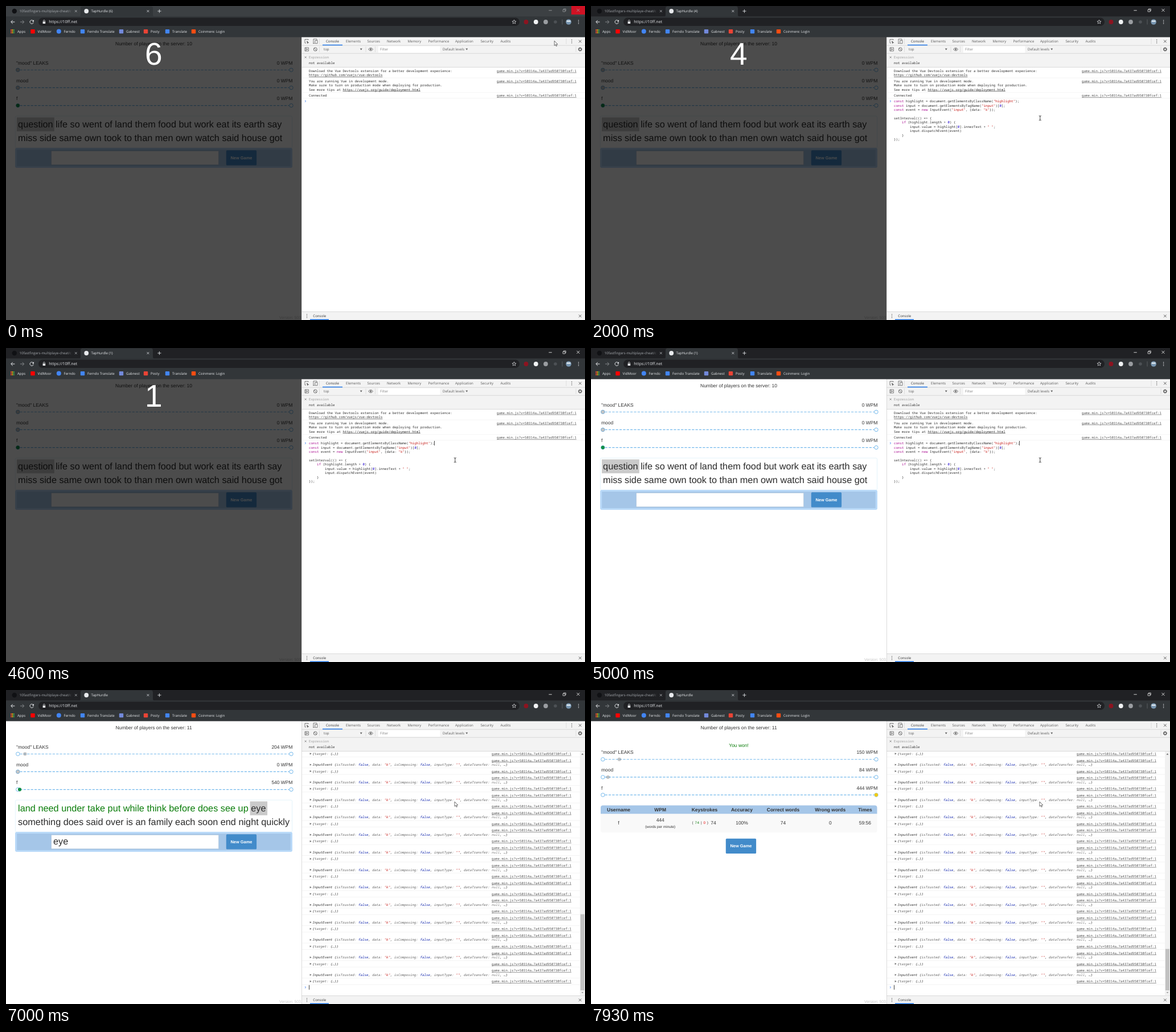
Write an HTML page that moves like this. It is 1017 px wide and 551 px high and loops after 8 s.

```html
<!DOCTYPE html>
<html lang="en">
<head>
<meta charset="utf-8">
<title>Typing race</title>
<style>
  html, body { margin: 0; width: 100%; height: 100%; overflow: hidden; background: #fff; }
  svg { display: block; width: 1017px; height: 551px; }
  text { text-rendering: geometricPrecision; text-decoration-thickness: 0.5px; }
  .page { font-family: "Liberation Sans", Arial, sans-serif; }
  .ui { font-family: "Open Sans", "Noto Sans", sans-serif; }
  .mono { font-family: "Noto Sans Mono", "DejaVu Sans Mono", monospace; }
</style>
</head>
<body>
<svg viewBox="0 0 1017 551">
  <defs>
    <linearGradient id="fade" gradientUnits="userSpaceOnUse" x1="108" y1="0" x2="117" y2="0">
      <stop offset="0" stop-color="#a4a8ad"/><stop offset="1" stop-color="#a4a8ad" stop-opacity="0"/>
    </linearGradient>
  </defs>
  <g id="page"></g><g id="tools"></g><g id="log"></g><g id="frame"></g><g id="browser"></g><g id="pointer"></g>
</svg>
<script>
const DURATION = 8000, ENTER = 6700, WORD_START = 6705, WORD_TIME = 7.7;
const LINES = [
  'question life so went of land them food but work eat its earth say',
  'miss side same own took to than men own watch said house got',
  'land need under take put while think before does see up eye',
  'something does said over is an family each soon end night quickly',
  'very much house white also found still every near add food paper',
  'between own below country plant last school father keep tree never'
].map(line => line.split(' '));
const WORD_COUNT = LINES.flat().length;
const WIN = WORD_START + WORD_COUNT * WORD_TIME;
const CODE = `const highlight = document.getElementsByClassName("highlight");
const input = document.getElementsByTagName("input")[0];
const event = new InputEvent("input", {data: "k"});

setInterval(() => {
    if (highlight.length > 0) {
        input.value = highlight[0].innerText + " ";
        input.dispatchEvent(event)
    }
});`.split('\n');
const LINK = 'game.min.js?v=50314a…7a437ad950730fcef:1';
const BIG = 16.3, BODY = 8.46, MONO = 5.83, UI = 6.1;

const range = n => [...Array(n).keys()];
const rect = (x, y, w, h, fill, extra = '') =>
  `<rect x="${x}" y="${y}" width="${w}" height="${h}" fill="${fill}" ${extra}/>`;
const circle = (x, y, r, fill, extra = '') => `<circle cx="${x}" cy="${y}" r="${r}" fill="${fill}" ${extra}/>`;
const path = (d, stroke, width = 0.8, extra = '') =>
  `<path d="${d}" fill="none" stroke="${stroke}" stroke-width="${width}" ${extra}/>`;
const shape = (d, fill) => `<path d="${d}" fill="${fill}"/>`;
// y is the visual middle of the text; drop leads from there to the baseline, in em
const label = (family, size, fill, drop = 0.33) => (x, y, s, extra = '') =>
  `<text class="${family}" font-size="${size}" x="${x}" y="${(y + size * drop).toFixed(2)}" fill="${fill}" ${extra}>${s}</text>`;
const body = label('page', BODY, '#333'), big = label('page', BIG, '#2b2b2b', 0.3);
const mono = label('mono', MONO, '#303030', 0.35), ui = label('ui', UI, '#5a5a5a');
const source = label('mono', MONO, '#555', 0.35);
const light = label('ui', UI, '#e8eaed');
const span = (fill, s) => `<tspan fill="${fill}">${s}</tspan>`;
const MID = 'text-anchor="middle"', END = 'text-anchor="end"', BOLD = 'font-weight="bold"';
const cross = (x, y, r, color, w = 0.8) =>
  path(`M${x - r} ${y - r}l${2 * r} ${2 * r}M${x + r} ${y - r}l${-2 * r} ${2 * r}`, color, w);
const dots = (x, y, color) => [-2.7, 0, 2.7].map(d => circle(x, y + d, 0.75, color)).join('');
const chevron = (y, color = '#367cf1') => path(`M525 ${y - 1.6}l1.7 1.6l-1.7 1.6`, color, 0.9);
const link = (right, y) => source(right, y, LINK, `${END} text-decoration="underline"`);

const pen = document.createElement('canvas').getContext('2d');
pen.font = `100px "Liberation Sans", Arial, sans-serif`;
const measure = s => pen.measureText(s).width * BIG / 100;

function raceRow(y, name, wpm, x, color) {
  const ring = 'stroke="#74b9ec" stroke-width="1"';
  return body(18, y, name) + body(503.5, y, wpm + ' WPM', END) +
    path(`M24.5 ${y + 12.2}H497.5`, '#74b9ec', 1.1, 'stroke-dasharray="4.24 2.12"') +
    circle(20.8, y + 12.2, 3.2, '#fff', ring) + circle(501, y + 12.2, 3.2, '#fff', ring) +
    circle(x.toFixed(2), y + 12.2, 3.1, color);
}

function button(x, y) {
  return rect(x, y, 53.3, 26.2, '#428bca', 'rx="1.6"') +
    label('page', 7.45, '#fff')(x + 26.6, y + 13.1, 'New Game', `${BOLD} ${MID}`);
}

function wordPanel(t) {
  let index = Math.max(0, Math.floor((t - WORD_START) / WORD_TIME)), row = 0;
  while (index >= LINES[row].length) index -= LINES[row++].length;
  const line = LINES[row], word = line[index];
  const done = line.slice(0, index).map(w => w + ' ').join('');
  return rect(16.4, 193.1, 486.2, 56, '#fff', 'rx="2" stroke="#d9f0f9" stroke-width="0.7"') +
    rect((19 + measure(done)).toFixed(2), 195.5, (measure(word) + 4.2).toFixed(2), 24.3, '#cacaca') +
    big(21.1, 207.8, span('#0a7d0a', done) + line.slice(index).join(' ')) +
    big(21.1, 232.1, (LINES[row + 1] || []).join(' ')) +
    rect(16, 249, 487, 35, '#b9d9f8', 'rx="3"') + rect(19.2, 252, 480.6, 29, '#a5c6e8') +
    rect(79.6, 254.2, 294, 24.6, '#fff', 'stroke="#a8bfd6" stroke-width="0.6"') +
    (t >= WORD_START ? big(83, 266.5, word) : '') + button(386.8, 253.3);
}

function resultTable() {
  const small = label('page', 6.35, '#333');
  const heads = [['Username', 48.5], ['WPM', 121.7], ['Keystrokes', 199.5], ['Accuracy', 265],
    ['Correct words', 337.5], ['Wrong words', 420.3], ['Times', 481.5]];
  const cells = [['f', 48.5, 233], ['444', 121.7, 228], ['74', 215, 233], ['100%', 265, 233],
    ['74', 337.5, 233], ['0', 420.3, 233], ['59:56', 481.3, 233]];
  return body(259.5, 97.6, 'You won!', `${MID} style="fill:#0a7d0a"`) +
    rect(17, 202.5, 485.5, 47.8, '#f9f9f9', 'rx="4"') +
    shape('M17 217.2V206.5a4 4 0 0 1 4 -4H498.5a4 4 0 0 1 4 4V217.2z', '#a5c6e8') +
    heads.map(([s, x]) => body(x, 209.8, s, `${MID} ${BOLD}`)).join('') +
    cells.map(([s, x, y]) => body(x, y, s, MID)).join('') +
    small(121.7, 240, '(words per minute)', MID) +
    small(177.5, 233.3, `( ${span('#0a7d0a', '74')} | ${span('#e00', '0')} )`, 'letter-spacing="0.55"') +
    button(236.8, 260.8);
}

function drawPage(t) {
  const won = t >= WIN, top = won ? 109.5 : 100;
  const glide = (start, speed) => 20.8 + Math.max(0, t - start) * speed / 1000;
  const lateWpm = t >= 7890;
  const runner = won ? 501 : glide(6935, 50);
  let s = rect(0, 54, 520, 497, '#fff') +
    body(259.5, 66.7, `Number of players on the server: ${t < 6200 ? 10 : 11}`, MID) +
    raceRow(top, '"mood" LEAKS', lateWpm ? 150 : t >= 6930 ? 204 : 0, glide(6286, 17.6), 'rgba(90,90,90,.34)') +
    raceRow(top + 31.2, 'mood', lateWpm ? 84 : 0, glide(7416, 17.6), 'rgba(90,90,90,.34)') +
    raceRow(top + 62.4, 'f', won ? 444 : t >= 6930 ? 540 : 0, runner, won ? '#f1cb15' : '#128f47') +
    (won ? resultTable() : wordPanel(t)) +
    label('page', 6.8, '#c4c4c4')(480, 547, 'Version: 50314a');
  if (t < 4990) {
    s += rect(0, 54, 520, 497, 'rgba(0,0,0,.7)') +
      label('page', 55, '#fff')(259.4, 84.6, 6 - Math.floor((t + 950) / 1000), MID);
  }
  return s;
}

function drawTools() {
  const tabs = { Console: 562, Elements: 597, Sources: 634.5, Network: 669, Memory: 705.5,
    Performance: 741.5, Application: 789, Security: 833.5, Audits: 868.5 };
  const bar = '#f3f3f3', edge = '#cdcdcd', icon = '#606060';
  return rect(519, 54, 498, 497, '#fff') + rect(519, 54, 498, 53.5, bar) + rect(519, 536.5, 498, 14.5, bar) +
    path('M519.5 54V551M519 69.2H1017M519 83.2H1017M519 107.5H1017M519 536.5H1017', edge, 0.7) +
    Object.entries(tabs).map(([s, x]) => ui(x, 62, s, s === 'Console' ? 'style="fill:#333"' : '')).join('') +
    rect(556, 67.8, 35, 1.4, '#1a73e8') + rect(534, 549.6, 33, 1.4, '#1a73e8') +
    path('M550.5 57V67M550.5 71V81M632 71V81M648.5 71V81M984 57V67M1001 71V81', '#d0d0d0', 0.6) +
    path('M531 60V58.5H525V65H527', icon) + shape('M528 60.5l4.4 4.2h-2l-1.1 1.8z', icon) +
    path('M540 65.5V58H546V60M542.8 60.5H547V65.7H542.8zM539 65.6H542', icon) +
    path('M525 73H531.5V79H525zM526.8 73V79', icon) + shape('M528.2 74.4l2.2 1.6l-2.2 1.6z', icon) +
    circle(543.3, 76, 3, 'none', `stroke="${icon}" stroke-width="0.9"`) + path('M541.2 74l4.2 4', icon, 0.9) +
    ui(558, 76, 'top') + shape('M621.8 74.6h4l-2 3z', icon) +
    path('M636.6 76q4 -5 8 0q-4 5 -8 0z', icon, 0.9) + circle(640.6, 76, 1.4, icon) +
    rect(654, 70.5, 108.5, 11.5, '#fff') + ui(657, 76.3, 'Filter', 'opacity="0.75"') +
    ui(767, 76, 'Default levels') + shape('M807.4 74.5h3.8l-1.9 3z', icon) +
    dots(993.7, 62, icon) + cross(1008.4, 62, 2.3, icon, 1) +
    circle(1008.4, 76, 2.2, 'none', `stroke="${icon}" stroke-width="1.4"`) +
    circle(1008.4, 76, 3.2, 'none', `stroke="${icon}" stroke-width="1" stroke-dasharray="1.26"`) +
    cross(526.2, 90, 1.5, '#777', 0.8) + mono(532, 90.3, 'Expression', 'opacity="0.45"') +
    mono(532, 100.3, 'not available') +
    dots(528.5, 544, icon) + ui(539.3, 544, 'Console', 'style="fill:#333"') + cross(1008.4, 544, 2.3, icon, 1);
}

const paint = line => line.replace(/"[^"]*"|\b(const|new|if)\b|\b0\b/g,
  m => span(m[0] === '"' ? '#c41a16' : m === '0' ? '#1c00cf' : '#aa0d91', m));

function caretOn(t) {
  if (t < 1460) return t >= 470 && t < 1050;
  const since = t < ENTER ? (t - 1460) / 523 : (t - ENTER) / 533;
  return Math.floor(since) % 2 === 0;
}
const caret = (t, x, y) => caretOn(t) ? rect(x, y - 4, 0.8, 8, '#111') : '';

function drawPrompt(t) {
  const under = s => `<tspan text-decoration="underline">${s}</tspan>`;
  const pasted = t >= 1460, entered = t >= ENTER;
  let s = mono(532, 113.7, 'Download the Vue Devtools extension for a better development experience:') +
    mono(532, 121.2, under('https://github.com/vuejs/vue-devtools')) +
    mono(532, 131.6, 'You are running Vue in development mode.') +
    mono(532, 139.1, 'Make sure to turn on production mode when deploying for production.') +
    mono(532, 146.5, 'See more tips at ' + under('https://vuejs.org/guide/deployment.html')) +
    mono(532, 157, 'Connected') + [113.7, 131.6, 157].map(y => link(1002, y)).join('') +
    path('M520 126.2H1017M520 151.8H1017M520 162H1017', '#ececec', 0.6) + chevron(167);
  if (pasted) {
    s += CODE.map((line, i) => {
      const text = line.trimStart();
      return mono(532 + 3.5 * (line.length - text.length), 167.2 + i * 7.43, paint(text));
    }).join('');
  }
  if (!entered) return s + caret(t, pasted ? 752.2 : 532.2, 167);
  return s + path('M526.6 242.7l-1.5 1.4l1.5 1.4', '#aaa', 0.7) + mono(532, 244.2, span('#1c00cf', '210')) +
    path('M520 249H1017', '#ececec', 0.6) + chevron(254.3) + caret(t, 532.2, 254.3);
}

function drawEvents(t) {
  const key = s => span('#626262', s), no = span('#0d22aa', 'false'), str = s => span('#c41a16', `"${s}"`);
  const event = `InputEvent {${key('isTrusted: ')}${no}, ${key('data: ')}${str('k')}, ${key('isComposing: ')}${no}, ` +
    `${key('inputType: ')}${str('')}, ${key('dataTransfer: ')}${span('#808080', 'null')}, …}`;
  const arrow = y => shape(`M533.7 ${y - 1.7}l2.9 1.7l-2.9 1.7z`, '#6e6e6e');
  const italic = 'font-style="italic"';
  const count = Math.min(WORD_COUNT, Math.floor((t - WORD_START) / WORD_TIME));
  const thumb = 410 * 430 / (150 + 30.8 * count);
  const rows = range(14).map(i => {
    const y = 111.8 + i * 30.73;
    const target = arrow(y) + mono(538, y, `{${key('target: ')}{…}}`, italic) + link(993, y) +
      path(`M520 ${y + 5.7}H1008`, '#ececec', 0.6);
    const next = y + 19.3;
    return target + (i === 13 ? '' : link(993, next - 7.6) + arrow(next) + mono(538, next, event, italic) +
      path(`M520 ${next + 5.7}H1008`, '#ececec', 0.6));
  }).join('');
  return rows + chevron(521.8) + caret(t, 532.2, 521.8) +
    rect(1008, 108, 9, 428.3, '#f1f1f1') + rect(1009, (527 - thumb).toFixed(2), 7, thumb.toFixed(2), '#c1c1c1') +
    shape('M1010.6 113.4h3.8l-1.9 -2.2z', '#555') + shape('M1010.6 530h3.8l-1.9 2.2z', '#999');
}

function drawFrame(t) {
  const focused = t >= 460, control = focused ? '#fff' : '#a3a4a6';
  const hover = Math.max(0, 1 - t / 260);
  const left = t < 5190 ? ` (${6 - Math.floor((t + 750) / 1000)})` : '';
  return rect(0, 0, 1017, 19, focused ? '#202124' : '#3c4043') +
    rect(993, 0, 24, 15, '#d01224', `opacity="${hover.toFixed(2)}"`) +
    path('M953.4 7.8H958.8', control) + path('M978.2 6.3H982V10H978.2zM979.5 6.2V5H983.3V8.7H982', control, 0.7) +
    cross(1005, 7.4, 2.5, control) +
    circle(14.8, 9, 4.2, '#101114') +
    label('ui', UI, 'url(#fade)')(23.5, 9, '10fastfingers-multiplaye-cheat/c') + cross(122.8, 9, 1.9, '#b5b8bc') +
    shape('M128 18.5q3 0 3 -3V4q0 -3.5 3.5 -3.5H254.5q3.5 0 3.5 3.5V15.5q0 3 3 3z', '#323639') +
    circle(141.2, 9, 3.9, '#e8eaed') + light(149.6, 9, 'TapHurdle' + left) + cross(249.4, 9, 1.9, '#dfe1e5') +
    path('M266.3 9H272.5M269.4 5.9V12.1', '#dfe1e5', 0.9);
}

function drawBrowser() {
  const white = '#e8eaed', gray = '#85888c';
  const star = range(10).map(i => {
    const a = i * Math.PI / 5, r = i % 2 ? 1.6 : 3.7;
    return `${(892.5 + r * Math.sin(a)).toFixed(2)} ${(28 - r * Math.cos(a)).toFixed(2)}`;
  }).join('L');
  const marks = [['VidMoor', 55.5, '#f00'], ['Ferndo', 101.5, '#4285f4', 1], ['Ferndo Translate', 143, '#4285f4'],
    ['Gabnest', 211, '#7289da'], ['Posty', 254, '#ea4335'], ['Translate', 292, '#4285f4'],
    ['Coinmere: Login', 338, '#ff4d12']];
  const apps = ['#ea4335', '#fbbc05', '#34a853'];
  return rect(0, 18.3, 1017, 36.4, '#323639') + rect(57, 20.5, 845, 14.6, '#202124', 'rx="7.3"') +
    path('M15.4 28H8.8M11.8 24.9L8.7 28L11.8 31.1', white, 1) +
    path('M25 28H31.6M28.6 24.9L31.7 28L28.6 31.1', gray, 1) +
    path('M48.1 26.6a3.2 3.2 0 1 0 .2 2.2', white, 1) + shape('M49 24.3v3.2h-3.2z', white) +
    rect(64.6, 27.2, 4.6, 3.9, white, 'rx="0.5"') + path('M65.5 27.3V26a1.4 1.4 0 0 1 2.8 0V27.3', white, 0.7) +
    label('ui', 7.1, white)(75.3, 28, 'https://10ff.net') +
    path(`M${star}z`, white, 0.7) +
    circle(913.5, 28, 3.9, '#8c1420') + circle(930.8, 28, 3.9, '#f1f3f4') + circle(948, 28, 3.9, '#9a9da1') +
    circle(965, 28, 2.8, '#4d5155') + path('M977 23.5V32.5', '#6a6d71', 0.7) +
    circle(988.2, 28, 4.8, '#7795b0') + rect(984.6, 25.2, 7.2, 2.8, '#d5e0e8', 'rx="1.3"') + dots(1005.6, 28, white) +
    range(9).map(i => rect(8 + i % 3 * 2.5, 41 + Math.floor(i / 3) * 2.5, 1.8, 1.8, apps[i % 3])).join('') +
    light(20, 44.6, 'Apps') +
    marks.map(([s, x, color, round]) => light(x, 44.6, s) +
      (round ? circle(x - 8.7, 44.6, 4, color) : rect(x - 12.2, 41, 7.4, 7.2, color, 'rx="1"'))).join('');
}

function drawPointer(t) {
  if (t >= 1460 && t < ENTER) {
    return path('M786.9 192.6Q788.8 192.6 788.8 194V199.3Q788.8 200.7 786.9 200.7M790.7 192.6Q788.8 192.6 788.8 194M788.8 199.3Q788.8 200.7 790.7 200.7', '#111', 0.8);
  }
  const p = Math.min(1, Math.max(0, (t - 20) / 310)), ease = p * p * (3 - 2 * p);
  const x = 963.2 - 175.2 * ease, y = 61.2 + 134.8 * ease;
  return `<path d="M${x.toFixed(2)} ${y.toFixed(2)}v8.2l1.9 -1.7l1.3 2.9l1.3 -.6l-1.3 -2.8h2.6z" fill="#fff" stroke="#111" stroke-width="0.6"/>`;
}

const shown = {};
function put(id, markup) {
  if (shown[id] === markup) return;
  shown[id] = markup;
  document.getElementById(id).innerHTML = markup;
}

function render(t) {
  put('page', drawPage(t));
  put('log', t > 6810 ? drawEvents(t) : drawPrompt(t));
  put('frame', drawFrame(t));
  put('pointer', drawPointer(t));
}

put('tools', drawTools());
put('browser', drawBrowser());
render(0);
let start;
requestAnimationFrame(function tick(now) {
  start ??= now;
  render((now - start) % DURATION);
  requestAnimationFrame(tick);
});
</script>
</body>
</html>
```
